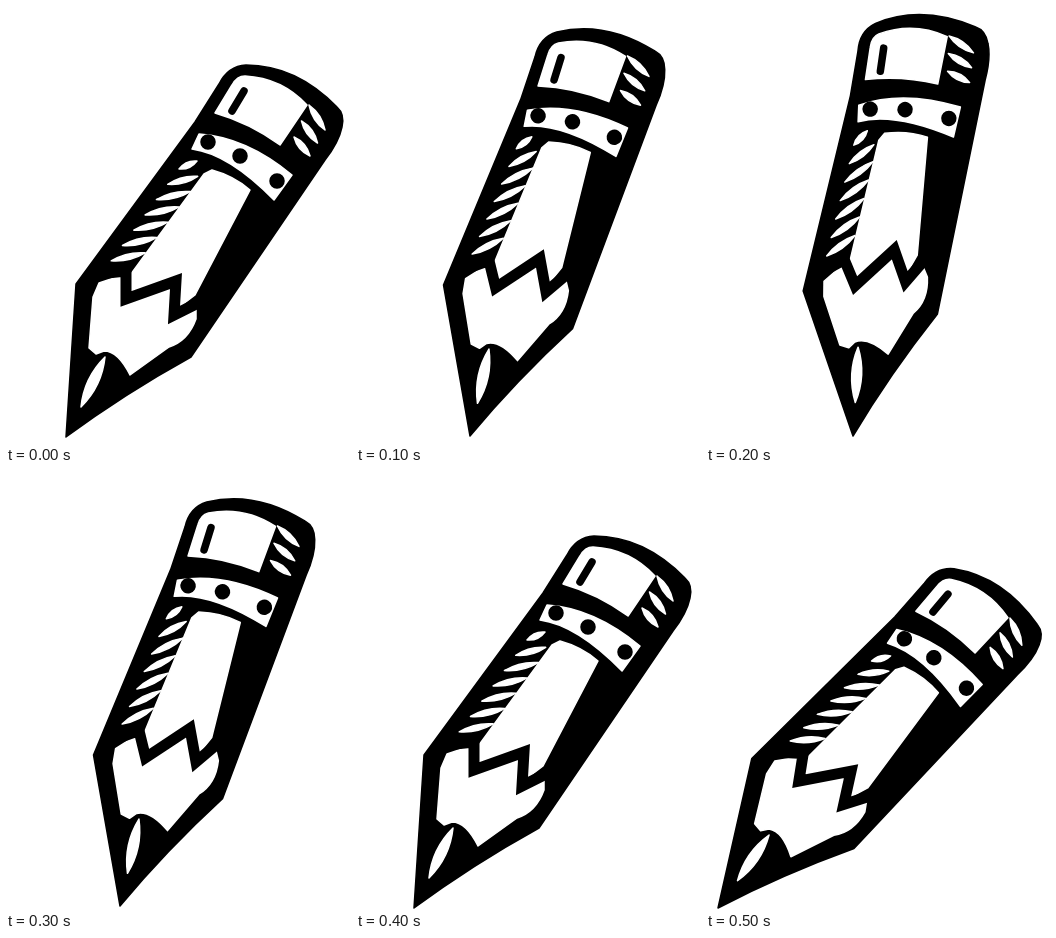
Animation of 344x438 px, one loop 600 ms. Source, as an HTML page:

```html
<!DOCTYPE html>
<html lang="en">
<head>
<meta charset="utf-8">
<title>Wobbling pencil</title>
<style>
  html, body { margin: 0; height: 100%; overflow: hidden; background: #fff; }
  svg { display: block; width: 344px; height: 438px; }
  .ink { stroke: #000; stroke-width: 1.5; stroke-linejoin: round; }
  .paper { fill: #fff; stroke: #fff; stroke-width: 1.5; stroke-linejoin: round; }
  .line { fill: none; stroke: #000; stroke-linecap: round; }
</style>
</head>
<body>
<svg viewBox="0 0 344 438">
  <!-- drawn with the tip at 60,431 -->
  <g id="pencil">
    <path class="ink" d="M60 431L70 278 189 116 213 78Q222 60 240 59Q290 59 331 101Q339 108 336 121Q333 136 319 154L185 351Q118 388 60 431Z"/>
    <!-- eraser -->
    <path class="paper" d="M209 107L226 79Q231 70 239 70Q276 72 301 99L274 139Q244 117 209 107Z"/>
    <path class="line" stroke-width="7.5" d="M238 85L226 105"/>
    <!-- metal band -->
    <path class="paper" d="M193 128Q240 131 286 169L268 194Q223 148 186 143Z"/>
    <path class="line" stroke-width="15.5" d="M202 136h.01M234 150h.01M271 175h.01"/>
    <!-- body, then wood -->
    <path class="paper" d="M198 168L206 164Q228 170 244 184L189 289 168 305 169 275 120 293 125 268Z"/>
    <path class="paper" d="M83 342L87 291 93 277 120 268 120 293 169 275 168 309 190 300V313Q182 335 163 341L124 369Q112 345 98 345L90 348Z"/>
    <path class="line" stroke-width="11" d="M92 268L120 265V293L170 275 168 309 190 298"/>
    <path class="paper" id="glints"/>
  </g>
</svg>
<script>
const STEP = 100;
// tip x, tip y, tilt in degrees
const poses = [
  [60, 431, 0], [114, 430, -13.7], [147, 430, -22.7],
  [114, 434, -13.7], [58, 436, 0], [12, 436, 9]
];
const pencil = document.getElementById('pencil');

// pointed oval from (x, y) along (dx, dy)
function leaf(x, y, dx, dy, width) {
  const k = width / Math.hypot(dx, dy);
  const side = s => `${dx / 2 - s * k * dy} ${dy / 2 + s * k * dx}`;
  return `M${x} ${y}q${side(1)} ${dx} ${dy}Q${x + dx / 2 + k * dy} ${y + dy / 2 - k * dx} ${x} ${y}Z`;
}

let glints = leaf(99, 351, -24, 50, 10);
for (let i = 0; i < 3; i++) glints += leaf(303 - 7.5 * i, 99 + 16 * i, 16, 25 - 3 * i, 6);
for (let i = 0; i < 7; i++) glints += leaf(173 - 11.3 * i, 163 + 15.3 * i, Math.min(34, 18 + 12 * i), -8, 5.5);
document.getElementById('glints').setAttribute('d', glints);

function draw(now) {
  const [x, y, tilt] = poses[Math.floor(now / STEP) % poses.length];
  pencil.setAttribute('transform', `translate(${x} ${y}) rotate(${tilt}) translate(-60 -431)`);
  requestAnimationFrame(draw);
}
draw(performance.now());
</script>
</body>
</html>
```
